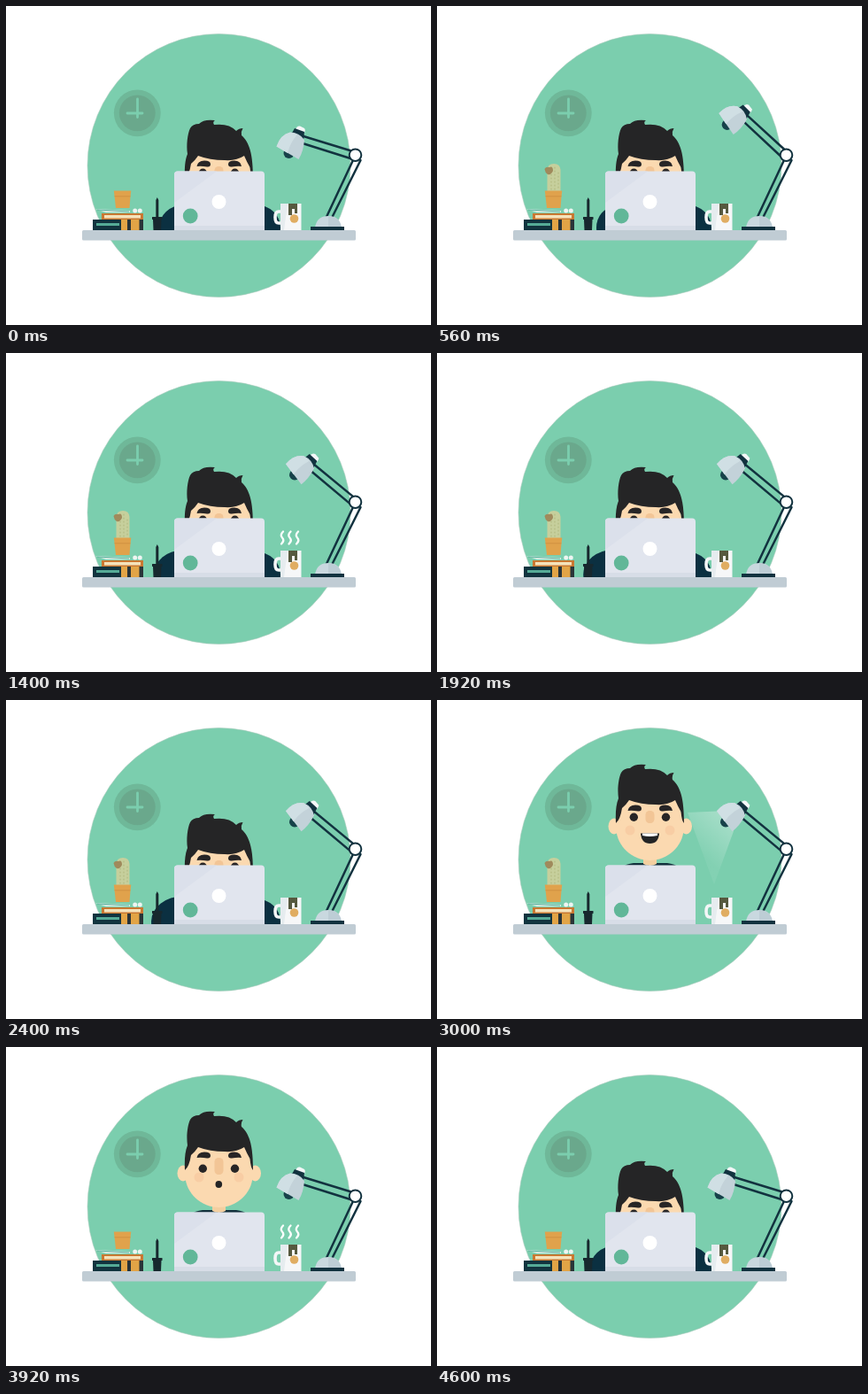
Write an HTML page that moves like this. It is 480x360 px and loops after 4640 ms.

```html
<!DOCTYPE html>
<html lang="en">
<head>
<meta charset="utf-8">
<title>Working at the desk</title>
<style>
html, body { margin: 0; width: 100%; height: 100%; overflow: hidden; background: #fff; }
svg { display: block; width: 100%; height: 100%; }
.line { fill: none; stroke-linecap: round; }
</style>
</head>
<body>
<svg viewBox="0 0 480 360">
  <defs>
    <linearGradient id="glow" gradientUnits="userSpaceOnUse" x1="335" y1="126" x2="294" y2="170">
      <stop offset="0" stop-color="#fff" stop-opacity=".38"/>
      <stop offset="1" stop-color="#fff" stop-opacity=".06"/>
    </linearGradient>
    <clipPath id="abovePot"><path d="M110 165h45v44h-45z"/></clipPath>
    <clipPath id="aboveDesk"><path d="M0 0h480v254h-480z"/></clipPath>
  </defs>
  <circle cx="240.500" cy="180" r="148.500" fill="#7bceae" stroke="#a9cbbd" stroke-width=".6"/>

  <g id="clock">
    <circle cx="148.300" cy="120.800" r="26.400" fill="#6fb899"/>
    <circle cx="148.300" cy="120.800" r="20.400" fill="#6aa88c"/>
    <path class="line" d="M148.500 105v20.500M137 121h17" stroke="#7bceae" stroke-width="2.800"/>
  </g>

  <path id="beam" d="M327 125L283 127L313 208L335 148z" fill="url(#glow)"/>

  <g clip-path="url(#aboveDesk)">
    <g fill="#0b3041">
      <ellipse id="elbowL" cx="200" cy="250"/>
      <ellipse id="elbowR" cx="282" cy="250"/>
    </g>
    <g id="head">
      <path d="M202 240V200Q205 186 222 184H260Q277 186 280 200V240z" fill="#12303c"/>
      <path d="M233 170h15v15q-7.500 4-15 0z" fill="#f3cfa0"/>
      <g fill="#fbd9b0">
        <ellipse cx="200" cy="142.500" rx="6.500" ry="9"/>
        <ellipse cx="281.500" cy="142.500" rx="6.500" ry="9"/>
        <path d="M202.500 136L212 108H270L278.500 136V146C278 165 260 181 240.500 181S203 165 202.500 146z"/>
      </g>
      <g fill="#f8cda4">
        <circle cx="218" cy="147" r="5.500"/>
        <circle cx="263" cy="147" r="5.500"/>
      </g>
      <path d="M202 139C201.500 128 202 118 205 111C203.500 101 205 88 208 82Q211 77 218 77Q223 71.500 236 73Q233 75 235 78Q252 76 260 85Q263 82 267.500 82Q265 86 266 90C275 98 279 111 279 139Q276.500 137 275.500 126Q272 120 269 113Q260 119 247 118Q230 118 217 113Q213 119 209 122Q207 135 202 139z" fill="#252526"/>
      <g fill="#272526">
        <path d="M215.500 125Q216.500 118.500 224 118.500Q231 118.500 231 122.500Q231 126 227 125.500Q221 124.500 215.500 125zM266 125Q265 118.500 258 118.500Q251 118.500 251 122.500Q251 126 255 125.500Q261 124.500 266 125z"/>
        <g id="eyes"><circle cx="222.300" cy="132.300" r="4.700"/><circle cx="258.500" cy="132.300" r="4.700"/></g>
      </g>
      <rect id="nose" x="235.500" y="125" width="10" rx="4.500" fill="#f2c596"/>
      <g id="smile">
        <path d="M230 150.500H251Q250 162 240.500 162T230 150.500z" fill="#232425"/>
        <path d="M232 150.500H249V153Q240 155 232 153z" fill="#fff"/>
      </g>
      <ellipse id="gasp" cx="240.300" cy="155" rx="3.800" ry="4" fill="#232425"/>
    </g>
  </g>

  <path id="pencilHolder" d="M169.300 238V219L170.800 216L172.300 219V238zM165 238H176.500V241H165zM166 241H175.500L175 253H166.500z" fill="#17282e"/>

  <g id="laptop">
    <rect x="190" y="186.500" width="102" height="68" rx="4" fill="#e1e5ee"/>
    <path d="M194 186.500H238L190 222V190.500Q190 186.500 194 186.500z" fill="#dbe0eb"/>
    <path d="M190 248H292V254H190z" fill="#d7dde7"/>
    <circle cx="240.500" cy="221" r="8" fill="#fff"/>
    <circle cx="208.200" cy="237" r="8.400" fill="#61b798"/>
  </g>

  <g id="books">
    <path d="M98 241H130V253H98z" fill="#12343f"/>
    <path d="M102 245H128V248H102z" fill="#55ab97"/>
    <path d="M130 241H155V253H130z" fill="#e2a446"/>
    <path d="M137 241H141V253H137zM150.500 241H155V253H150.500z" fill="#293438"/>
    <path d="M108 234H155V241H108z" fill="#c97832"/>
    <path d="M111 236H152V239.500H111z" fill="#f5e3bb"/>
    <path d="M101 229L140 231V233H113z" fill="#d8eee6"/>
    <path d="M103 230L139 232" stroke="#58af9b"/>
    <g fill="#eef5f2"><circle cx="145.700" cy="231" r="2.500"/><circle cx="151.300" cy="231" r="2.500"/></g>
  </g>

  <g clip-path="url(#abovePot)">
    <g id="cactus">
      <path d="M124.500 211V185Q125 178 132 178T139.500 185V211z" fill="#c6cf9c"/>
      <path class="line" d="M129 190V207M133 182V207M137 188V207" stroke="#b3b981" stroke-width="1.200" stroke-dasharray="1 3"/>
      <path d="M121.500 184Q123 181 127 182Q131 180 131 186Q129 191 125 190Q122 188 121.500 184z" fill="#a08a5c"/>
    </g>
  </g>
  <path d="M121.800 208.500H141.300L140.500 215L139.500 228H124L122.600 215z" fill="#e0a24c"/>
  <path d="M122.500 214H140.600L140.300 215.500H122.800z" fill="#d59645"/>

  <g id="steam" class="line" stroke="#fff" stroke-width="2.300"></g>
  <g id="mug">
    <path class="line" d="M311 232H308Q304 232 304 238.500T308 245H311" stroke="#f4f6f7" stroke-width="3.600"/>
    <path d="M310 223H333.500V253H310z" fill="#f6f7f8"/>
    <path d="M310 223H318L314 253H310z" fill="#e6ecef"/>
    <path d="M319 223H329V234H326V229H323V236H319z" fill="#56593f"/>
    <circle cx="325.500" cy="240" r="4.800" fill="#e0ad62"/>
  </g>

  <g id="lamp">
    <path class="line" d="M361.500 239L391.500 175M368 239L400.500 174" stroke="#12323f" stroke-width="2.500"/>
    <path d="M349 250Q351 237 364 237T379 250z" fill="#c9d8df"/>
    <path d="M364 237Q377 238 379 250H364z" fill="#bdcdd5"/>
    <path d="M344 249H382V253.500H344z" fill="#12323f"/>
    <g id="arm">
      <path class="line" d="M390 163.500L336 147M389 172L335 155" stroke="#12323f" stroke-width="2.500"/>
      <circle cx="319.500" cy="166" r="6" fill="#17424a"/>
      <path d="M327 140Q328 135 332 135.500L337 138Q339 140 336 145z" fill="#f4f7f8"/>
      <path d="M322 145L326 138L337 142L336 152z" fill="#12323f"/>
      <path d="M305.500 158.500Q310 145 321 142.500Q331 142.500 337 151Q336 164 330.500 173z" fill="#c3d2d9"/>
      <path d="M305.500 158.500Q310 145 321 142.500L329 145Q321 154 318 166z" fill="#d0dfe4"/>
    </g>
    <circle cx="394.500" cy="168.200" r="6.800" fill="#fff" stroke="#12323f" stroke-width="2"/>
  </g>

  <rect x="86" y="253" width="309" height="11.600" rx="1.500" fill="#c0ccd4"/>
</svg>
<script>
const LOOP = 4640;
const el = id => document.getElementById(id);
const set = (id, attrs) => {
  for (const name in attrs) el(id).setAttribute(name, attrs[name]);
};

// Smooth interpolation through [time, value] points.
function track(t, ...points) {
  if (t <= points[0][0]) return points[0][1];
  for (let i = 1; i < points.length; i++) {
    const [t0, a] = points[i - 1], [t1, b] = points[i];
    if (t <= t1) {
      const p = (t - t0) / (t1 - t0);
      return a + (b - a) * p * p * (3 - 2 * p);
    }
  }
  return points[points.length - 1][1];
}

el("steam").innerHTML = [311, 319.500, 328].map(x =>
  `<path pathLength="1" d="M${x} 215.500q4-4 1-7t1-7"/>`).join("");

function draw(now) {
  const t = now % LOOP;
  const raise = track(t, [120, 0], [500, 1.16], [740, 1], [3280, 1], [3580, -.06], [3720, 0]);
  const down = track(t, [2480, 56], [2780, -3], [2920, 0], [4060, 0], [4360, 58], [4480, 56]);
  const grown = track(t, [120, 0], [440, 1.05], [560, 1], [3340, 1], [3640, 0]);
  const startled = track(t, [3420, 0], [3600, 1], [4100, 1], [4300, 0]);
  const reach = track(t, [0, 27], [520, 20], [640, 20], [1300, 33], [2400, 36],
    [2750, 8], [4100, 8], [4480, 27]);
  const side = track(t, [2400, 28], [2750, 8], [4100, 8], [4480, 28]);

  set("arm", { transform: `rotate(${22.5 * raise} 394.5 168.2)` });
  set("beam", { opacity: track(t, [2700, 0], [2880, 1], [3200, 1], [3300, 0]) });
  set("head", { transform: `translate(0 ${down})` });
  set("eyes", { transform: `translate(0 ${5 * startled})` });
  set("nose", { height: 14 + 5 * startled });
  set("smile", { opacity: startled < .5 ? 1 : 0 });
  set("gasp", { opacity: startled < .5 ? 0 : 1 });
  set("elbowL", { rx: reach, ry: 16 + reach * .35 });
  set("elbowR", { rx: side, ry: 16 + side * .35 });
  set("cactus", { transform: `translate(0 ${34 * (1 - grown)})` });

  // Steam rises from the mug, then leaves through the top.
  const s = t < 2520 ? t : t - 2520;
  const top = track(s, [900, 0], [1250, 1]);
  const bottom = track(s, [1500, 0], [1850, 1]);
  set("steam", {
    opacity: top > bottom ? 1 : 0,
    "stroke-dasharray": `${Math.max(.001, top - bottom)} 3`,
    "stroke-dashoffset": -bottom
  });
  requestAnimationFrame(() => draw(performance.now()));
}
draw(performance.now());
</script>
</body>
</html>
```
